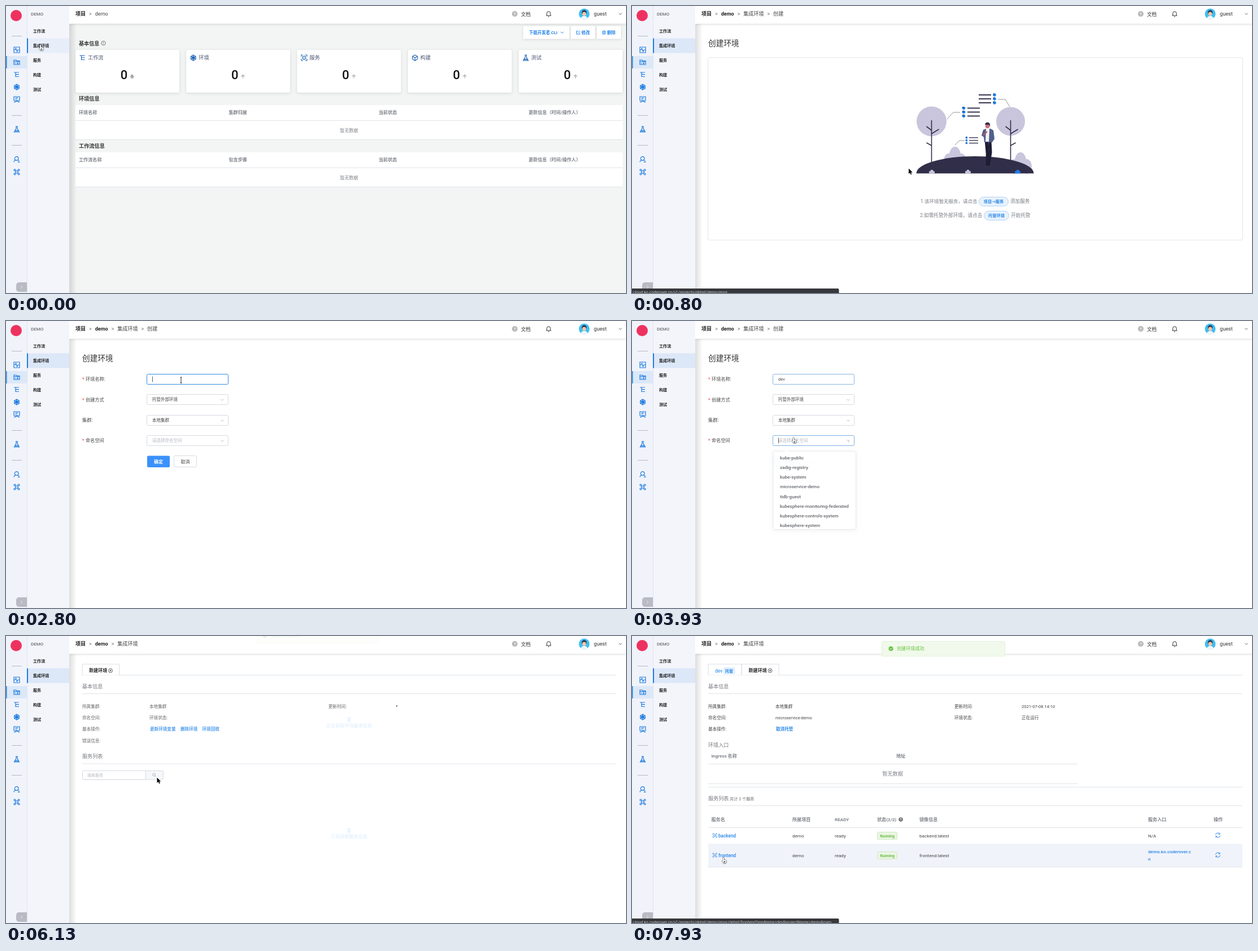
Animation, 1098 px wide and 510 px high, one loop 8 s. Source, as an HTML page with a canvas:

```html
<!DOCTYPE html>
<html lang="en">
<head>
<meta charset="utf-8">
<title>Create environment</title>
<style>
html, body { margin: 0; width: 100%; height: 100%; overflow: hidden; background: #fff }
canvas { display: block }
</style>
</head>
<body>
<canvas id="stage" width="1098" height="510"></canvas>
<script>
const g = document.getElementById('stage').getContext('2d');
const FONT = 'Roboto, "Noto Sans CJK SC", "Noto Sans CJK", sans-serif';
const BLUE = '#2585e8', LINE = '#dfe3ea', GRAY = '#7f838a', INK = '#333', FIELD = '#d6dae1';
const LOOP = 8000;
// Moments of the story, in ms
const OPEN_CREATE = 270, OPEN_FORM = 1330, FOCUS_NAME = 2500, OPEN_LIST = 3826,
      PICK = 5280, OPEN_ENV = 6100, LOADED = 6550;

const clamp = u => Math.max(0, Math.min(1, u));
const ramp = (t, start, length) => clamp((t - start) / length);
const smooth = u => u * u * (3 - 2 * u);

const ICONS = {
  pulse: 'M-5-5h10v10h-10zM-5 0h2l1.5-3 2 6 1.5-3h3',
  folder: 'M-5-4h4l1 1.5h5v6.5h-10zM-5-1.5h10M-3 .5h1M0 .5h3M-3 2.3h1M0 2.3h3',
  flow: 'M-5-4h9M-2-4v7.5h6M-2-.3h6',
  gear: 'M0-5 4.3-2.5v5L0 5-4.3 2.5v-5zM0-5V5M-4.3-2.5l8.6 5M4.3-2.5l-8.6 5M0-2.5 2.2-1.2v2.4L0 2.5-2.2 1.2v-2.4z',
  card: 'M-5-5h10v7h-10zM-2.5-2.7h5M-2.5-.5h3M-5 4.6h2l2-1.4h3l1 1.4h2.2',
  flask: 'M-2-5h4M-1-5v3.5L-4.5 5h9L1-1.5V-5M-3 2h6M-3.4 3.5h6.8',
  person: 'M3-1.5a3.3 3.3 0 1 1-6.6 0a3.3 3.3 0 1 1 6.6 0M-5 5q.5-4 4-3.5M2 2.5h3M2 4.8h3.5',
  command: 'M-2-2h4v4h-4zM-2-2h-1.3a1.5 1.5 0 1 1 1.3-1.3zM2-2v-1.3a1.5 1.5 0 1 1 1.3 1.3zM2 2h1.3a1.5 1.5 0 1 1-1.3 1.3zM-2 2v1.3a1.5 1.5 0 1 1-1.3-1.3z',
  cube: 'M0-5 4.5-2.5v5L0 5-4.5 2.5v-5zM-4.5-2.5 0 0 4.5-2.5M0 0V5',
  service: 'M-5-2v-3h3M5-2v-3h-3M-5 2v3h3M5 2v3h-3M0-3.2 2.8-1.6v3.2L0 3.2-2.8 1.6v-3.2zM-1 0h2',
  edit: 'M0-2.5h-3v5.5h5.5V0M-1 1l4-4',
  trash: 'M-3-2h6M-2.3-2v5h4.6v-5M-1-3h2M-.8-.5v2M.8-.5v2',
  refresh: 'M-4-.5A4 4 0 0 1 3.5-2M3.5-4.2v2.4H1M4 .5A4 4 0 0 1-3.5 2M-3.5 4.2V1.8H-1',
  bell: 'M-4.5 3h9M-3.2 3v-4a3.2 3.2 0 0 1 6.4 0v4M-1 5h2',
  search: 'M2-.5a2.4 2.4 0 1 1-4.8 0a2.4 2.4 0 1 1 4.8 0M1.3 1.2 3 3',
  plus: 'M3.5 0a3.5 3.5 0 1 1-7 0a3.5 3.5 0 1 1 7 0M-1.7 0h3.4M0-1.7v3.4',
  info: 'M3.7 0a3.7 3.7 0 1 1-7.4 0a3.7 3.7 0 1 1 7.4 0M0-2v2.4M0 1.2v.9',
  spinner: 'M-2.5-3h5L-2.5 3h5z',
  chevron: 'M-2.6-1.3 0 1.3 2.6-1.3',
  check: 'M-2 0l1.4 1.5 2.6-2.8'
};
for (const name in ICONS) ICONS[name] = new Path2D(ICONS[name]);
const ARROW = new Path2D('M0 0v9.5l2.2-2 1.6 3.4 1.5-.7-1.5-3.3h3z');
const HAND = new Path2D('M-.8 6V.8a.9.9 0 0 1 1.8 0V4l3.6.9q1 .4.8 1.7l-.8 4H0L-2.6 7q-.3-1.2.8-1z');
const IBEAM = new Path2D('M-1.5-5h3M0-5V5M-1.5 5h3');

// y is the optical middle of the line
function text(s, x, y, size, color = INK, weight = 400, align = 'left') {
  g.font = `${weight} ${size}px ${FONT}`;
  g.textAlign = align;
  g.fillStyle = color;
  g.fillText(s, x, y + size * .37);
}
function rect(x, y, w, h, fill, stroke, r = 0) {
  g.beginPath();
  g.roundRect(x, y, w, h, r);
  paint(fill, stroke);
}
function circle(x, y, r, fill, stroke) {
  g.beginPath();
  g.arc(x, y, r, 0, 7);
  paint(fill, stroke);
}
function paint(fill, stroke, width = 1) {
  g.lineWidth = width;
  if (fill) { g.fillStyle = fill; g.fill(); }
  if (stroke) { g.strokeStyle = stroke; g.stroke(); }
}
function line(color, width, ...p) {
  g.beginPath();
  for (let i = 0; i < p.length; i += 2) g.lineTo(p[i], p[i + 1]);
  paint(null, color, width);
}
const rule = (y, x2 = 1081, x1 = 135) => line(LINE, 1, x1, y, x2, y);
function at(x, y, draw) {
  g.save();
  g.translate(x, y);
  draw();
  g.restore();
}
function icon(name, x, y, color = BLUE, width = 1, angle = 0) {
  at(x, y, () => {
    g.rotate(angle);
    g.strokeStyle = color;
    g.lineWidth = width;
    g.stroke(ICONS[name]);
  });
}
function shadowed(blur, alpha, draw) {
  g.save();
  g.shadowColor = `rgba(0,0,0,${alpha})`;
  g.shadowBlur = blur;
  g.shadowOffsetY = 1;
  draw();
  g.restore();
}
function faded(alpha, draw) {
  g.save();
  g.globalAlpha *= alpha;
  draw();
  g.restore();
}
function mix(a, b, u) {
  return `rgb(${a.map((v, i) => v + (b[i] - v) * u)})`;
}

function sidebar(t) {
  rect(0, 0, 37, 510, '#f1f3fa');
  rect(37, 0, 75, 510, '#f3f5fb');
  g.setLineDash([1, 1]);
  line('#cfd4df', 1, 37.5, 0, 37.5, 510);
  g.setLineDash([]);
  circle(18, 17, 10, '#ee3260');
  for (const y of [53.5, 194.5, 247.5]) line('#b4b9c4', 1, 10, y, 28, y);
  rect(0, 89, 37, 22, '#dce8f8');
  rect(0, 89, 1.5, 22, BLUE);
  const items = { pulse: 78, folder: 100, flow: 122, gear: 144, card: 166, flask: 219, person: 272.5, command: 295 };
  for (const name in items) icon(name, 19, items[name], '#1b7be0', 1.2);
  rect(18, 491, 19, 17, '#b8bbc3', null, [5, 0, 0, 5]);
  icon('chevron', 27.5, 499.5, '#eee', 1, -Math.PI / 2);

  text('DEMO', 44, 14.5, 8, '#6b6e75', 500);
  rect(37, 57.5, 75, 26, t < OPEN_CREATE ? '#e7eefa' : '#dce7f8');
  rect(37, 57.5, 2, 26, '#1b7be0');
  ['工作流', '集成环境', '服务', '构建', '测试'].forEach((s, i) => text(s, 48, 44.5 + 26 * i, 7.1, '#222', 700));
}

function header(crumbs) {
  shadowed(3, .12, () => rect(112, 0, 986, 31.5, '#fff'));
  const gap = 16.5;
  let x = 123;
  crumbs.forEach((s, i) => {
    if (i) {
      text('>', x + gap / 2, 14, 9, '#666', 400, 'center');
      x += gap;
    }
    const strong = i === 0 || (i === 1 && crumbs.length > 2);
    text(s, x, 14, 9.1, strong ? '#222' : '#444', strong ? 700 : 400);
    x += g.measureText(s).width;
  });
  circle(901, 14, 5, '#b9b9b9');
  text('?', 901, 14, 7.5, '#fff', 500, 'center');
  text('文档', 912, 14.5, 8.6);
  icon('bell', 961, 14, '#333');
  circle(1024, 14, 9.5, '#3fbdf2');
  g.save();
  g.beginPath();
  g.arc(1024, 14, 9.5, 0, 7);
  g.clip();
  circle(1024, 24, 6.5, '#f4f8fb');
  circle(1024, 11.5, 4.3, '#2b3550');
  circle(1024, 14, 3.4, '#f3c6a5');
  g.restore();
  text('guest', 1041, 14, 9.2);
  icon('chevron', 1088, 14, '#666');
}

function dashboard() {
  rect(112, 0, 986, 510, '#f3f4f4');
  for (const [x, w] of [[916, 82], [1000, 43.5], [1046, 43]])
    shadowed(4, .12, () => rect(x, 35.5, w, 23, '#fff', null, 1));
  text('下载开发者 CLI', 926, 47, 7.5, BLUE, 700);
  icon('chevron', 985, 47);
  icon('edit', 1013.5, 47);
  text('修改', 1019, 47, 7.5, BLUE, 700);
  icon('trash', 1059, 47);
  text('删除', 1064.5, 47, 7.5, BLUE, 700);
  text('基本信息', 129, 66.5, 9.1, INK, 700);
  icon('info', 172.5, 66, '#555', .8);
  [['flow', '工作流', '条'], ['gear', '环境', '个'], ['service', '服务', '个'], ['cube', '构建', '个'], ['flask', '测试', '个']]
    .forEach(([name, title, unit], i) => {
      const x = 123 + 196.25 * i;
      shadowed(5, .12, () => rect(x, 78, 184, 76, '#fff', null, 3));
      icon(name, x + 12.5, 92, '#1d62b5', 1.1);
      text(title, x + 22, 91.5, 9.2, '#4a5570');
      text('0', x + 86, 121.5, 22, '#111', 500, 'center');
      text(unit, x + 97, 125.5, 7, '#444');
    });
  summary('环境', 165, ['环境名称', '集群归属']);
  summary('工作流', 249, ['工作流名称', '包含步骤']);
}
function summary(title, y, columns) {
  text(title + '信息', 129, y, 9.2, INK, 700);
  rect(123, y + 11, 969, 61.5, '#fff');
  columns.concat('当前状态', '更新信息（时间/操作人）')
    .forEach((s, i) => text(s, 129 + 265.5 * i, y + 24.5, 8.1, GRAY, 700));
  rule(y + 38.5, 1092, 123);
  text('暂无数据', 607.5, y + 56, 8.1, GRAY, 400, 'center');
  rule(y + 72.5, 1092, 123);
}

function createPage() {
  text('创建环境', 135, 66, 13.7, INK);
  rect(134.5, 91.5, 947, 324.5, '#fff', '#e1e4e9', 3);
  illustration();
  hint(511, 347, '1.该环境暂无服务，请点击', 8.5, 614, 53, '项目->服务', '添加服务');
  hint(510, 372, '2.如需托管外部环境，请点击', 8.6, 623, 45, '托管环境', '开始托管');
}
function hint(x, y, before, size, pillX, pillW, label, after) {
  text(before, x, y, size, '#777a80');
  rect(pillX + .5, y - 7.5, pillW - 1, 16, '#e8f2fd', '#b3d3f5', 8);
  text(label, pillX + pillW / 2, y + .5, 7.2, BLUE, 700, 'center');
  text(after, pillX + pillW + 3, y, 8.6, '#777a80');
}
function illustration() {
  const LILAC = '#c9c5dc', DARK = '#312e49';
  for (const [x, y, s] of [[572, 262, 1], [688, 272, 1]]) {
    g.beginPath();
    for (const [dx, dy, rx, ry] of [[0, 3, 10, 15], [-11, 13, 9, 13], [11, 13, 9, 13]]) {
      g.moveTo(x + dx + rx * s, y + dy);
      g.ellipse(x + dx, y + dy, rx * s, ry, 0, 0, 7);
    }
    paint(LILAC);
  }
  for (const [x, r] of [[530.5, 26.5], [670.5, 25.5]]) {
    circle(x, 205, r, LILAC);
    line(DARK, 1.6, x, 203, x, 278);
    line(DARK, 1.6, x - 9, 214, x, 221);
    line(DARK, 1.6, x + 13, 219, x, 227);
    const side = x < 600 ? -1 : 1;
    line(DARK, 1.6, x + side * 9, 243, x, 248);
  }
  g.beginPath();
  g.ellipse(607.5, 297.5, 104, 30.5, 0, Math.PI, 0);
  paint(DARK);
  for (const [x, color] of [[531, LILAC], [595, LILAC], [683, '#1f7cf0']]) {
    g.beginPath();
    g.roundRect(x - 5, 293.5, 10, 4, 1);
    g.roundRect(x - 2.5, 291, 5, 5, 2);
    paint(color);
  }
  for (const [x1, x2, dot, y, step] of [[614, 636, 642, 158, 7], [594, 616, 587.5, 181.5, 7], [597, 613, 592.5, 234, 4.8]])
    for (let i = 0; i < 3; i++) {
      line(DARK, step / 3.6, x1, y + step * i, x2, y + step * i);
      circle(dot, y + step * i, step * .4, '#2080ee');
      circle(dot - step * .2, y + step * i - step * .2, step * .14, DARK);
    }
  line('#777', .8, 648, 166, 661, 166, 669, 179);
  line('#777', .8, 581, 189, 569, 189, 558, 201);
  line('#777', .8, 589, 239, 580, 239, 572, 247);
  // Standing figure
  line('#1d1d33', 6.5, 628, 240, 630, 262, 630, 283);
  line('#1d1d33', 5, 634, 240, 635, 260, 631, 284);
  g.fillStyle = '#50608c';
  g.fill(new Path2D('M622 220l5-2h8l5 3 2 15-4 6h-14l-1-9-4-3z'));
  g.fillStyle = '#f5f3f5';
  g.fill(new Path2D('M627 218h6l-1 23h-6z'));
  line('#b85a68', 2.4, 622, 230, 629, 223);
  circle(629.5, 213.5, 3.8, '#c9707c');
  g.fillStyle = DARK;
  g.fill(new Path2D('M625 211q1-5 6-4 4 1 3 7l-2-3z'));
}

function field(y, value, options = {}) {
  const { color = '#444', focus = 0, turn = null, caret = null } = options;
  rect(249.5, y - 9, 144, 18, '#fff', mix([214, 218, 225], [48, 140, 225], focus), 2);
  text(value, 259, y - .5, 7.5, color);
  if (caret !== null) line('#333', .8, caret, y - 5, caret, y + 5);
  if (turn !== null) icon('chevron', 383, y + .5, '#b9bdc6', 1, -Math.PI * turn);
}
function formPage(t, tip) {
  text('创建环境', 135, 66, 13.7, INK);
  [['环境名称:', 103], ['创建方式', 139.5], ['集群:', 175.5], ['命名空间', 212]].forEach(([s, y], i) => {
    if (i !== 2) text('*', 135, y + 1, 8.2, '#f04848');
    text(s, i === 2 ? 135 : 141, y, 8.2, '#444');
  });
  const blur = ramp(t, OPEN_LIST, 200);
  const name = 'dev'.slice(0, Math.max(0, Math.floor((t - 2740) / 130)));
  const nameCaret = t > FOCUS_NAME && t < OPEN_LIST && Math.floor((t - FOCUS_NAME) / 500) % 2 === 0;
  field(103.5, name, { focus: ramp(t, FOCUS_NAME, 200) * (1 - blur), caret: nameCaret ? 259.5 + name.length * 4.2 : null });
  field(139.5, '托管外部环境', { turn: 0 });
  field(176.5, '本地集群', { turn: 0 });

  const picked = t >= PICK;
  const out = (start, power) => 1 - (1 - ramp(t, start, 300)) ** power;
  const open = out(OPEN_LIST, 5) - out(PICK, 5);
  const listCaret = t >= OPEN_LIST && !picked && Math.floor((t - OPEN_LIST) / 435) % 2 === 0;
  field(212.5, picked ? 'microservice-demo' : '请选择命名空间', {
    color: picked ? '#444' : '#b4b8c1', focus: blur,
    turn: out(OPEN_LIST, 2.8) - out(PICK, 2.8), caret: listCaret ? 259.5 : null
  });

  const hover = t > 5800;
  rect(250, 239.5, 40, 20.5, hover ? '#66adff' : '#3b91fb', null, 2);
  text('确定', 270, 250, 8.1, '#fff', 700, 'center');
  rect(297.5, 239.5, 40, 20, '#fff', FIELD, 2);
  text('取消', 317.5, 250, 8.1, '#444', 400, 'center');
  if (open > .005) dropdown(open, picked, tip);
}
function dropdown(open, picked, tip) {
  const top = 231.5, pitch = 19.45, pad = 3.4;
  const hovered = picked ? 3 : Math.floor((tip[1] - top - pad) / pitch);
  faded(open, () => at(250, top, () => {
    g.scale(1, open);
    shadowed(7, .08, () => rect(0, 0, 146.5, 157, '#fff', null, 2));
    rect(0, 0, 146.5, 157, '#fff', '#e4e7ed', 2);
    g.fillStyle = '#fff';
    g.fill(new Path2D('M20 .6l4-4 4 4z'));
    g.beginPath();
    g.rect(0, 0, 146.5, 157);
    g.clip();
    ['kube-public', 'zadig-registry', 'kube-system', 'microservice-demo', 'tidb-guest',
      'kubesphere-monitoring-federated', 'kubesphere-controls-system', 'kubesphere-system'].forEach((s, i) => {
      if (i === hovered) rect(0, pad + pitch * i, 146.5, pitch, '#f3f5f9');
      const chosen = picked && i === 3;
      text(s, 12, pad + pitch * (i + .5), 8.1, chosen ? BLUE : '#4c4f55', chosen ? 700 : 500);
    });
    if (hovered >= 0) rect(142.5, 1, 3, 80, '#d9dbdf', null, 1.5);
  }));
}

function tab(x, w) {
  g.beginPath();
  g.moveTo(x, 69.5);
  g.lineTo(x, 50);
  g.lineTo(x + w, 50);
  g.lineTo(x + w, 69.5);
  paint('#fff', '#d9dde5');
}
function newTab(x) {
  tab(x, 65.5);
  text('新建环境', x + 12, 61.5, 8.1, '#222', 700);
  icon('plus', x + 50, 61.5, '#333', .8);
}
const section = (s, y) => text(s, 135, y, 9.1, '#777a80');
const small = (s, x, y, color = '#444', weight = 400) => text(s, x, y, 7.6, color, weight);

function environmentPage(t, tip) {
  const loaded = t >= LOADED;
  rule(69.5);
  section('基本信息', 90);
  rule(102.5);
  small('所属集群:', 135, 125);
  small('本地集群', 254, 125);
  small('更新时间:', 571, 125);
  small('命名空间:', 135, 145.5);
  small('基本操作:', 135, 165.5);
  if (loaded) environmentData(tip); else environmentBlank();
  const veil = ramp(t, 6070, 300) * (1 - ramp(t, LOADED, 250));
  faded(veil, () => {
    faded(.9, () => { rect(135, 113, 946, 84, '#fff'); rect(135, 258, 946, 190, '#fff'); });
    [['环境基本', 159.5], ['服务', 356.5]].forEach(([s, y]) => {
      text(`正在获取${s}信息`, 607.5, y, 8.1, '#409eff', 400, 'center');
      icon('spinner', 607.5, y - 11, '#409eff');
    });
  });
}
function environmentBlank() {
  newTab(135);
  circle(692, 124.5, 1.2, '#444');
  small('环境状态:', 254, 145.5);
  small('更新环境变量', 255, 165.5, BLUE, 700);
  small('删除环境', 309, 165.5, BLUE, 700);
  small('环境回收', 347.5, 165.5, BLUE, 700);
  small('错误信息:', 135, 186);
  section('服务列表', 214);
  rule(227);
  rect(135.5, 239.5, 143, 15.5, '#f5f7fa', FIELD, 2);
  rect(135.5, 239.5, 111.5, 15.5, '#fff', FIELD, [2, 0, 0, 2]);
  text('搜索服务', 144, 247, 7, '#b4b8c1');
  icon('search', 262.5, 247, '#9a9ea6', .8);
}
function environmentData(tip) {
  tab(135, 59);
  text('dev', 147, 61.5, 8.6, BLUE);
  rect(162, 55.5, 20.5, 12.5, '#e1effd', null, 2);
  text('托管', 165, 62, 7, BLUE, 700);
  newTab(194.5);
  small('2021-07-08 14:10', 690, 125);
  small('microservice-demo', 254, 145.5);
  small('环境状态:', 571, 145.5);
  small('正在运行', 690, 145.5);
  small('取消托管', 255, 165.5, BLUE, 700);
  section('环境入口', 194);
  text('Ingress 名称', 140.5, 213.5, 8.1, GRAY, 700);
  text('地址', 468, 213.5, 8.1, GRAY, 700);
  rule(227.5, 789);
  text('暂无数据', 461.5, 245, 9.2, GRAY, 400, 'center');
  rule(262.5, 789);
  rule(268.5);
  section('服务列表', 288.5);
  text('共计 2 个服务', 173, 289.5, 7.2, '#666');
  rule(301.5);
  Object.entries({ 服务名: 140.5, 所属项目: 284, READY: 359, '状态(2/2)': 434, 镜像信息: 509, 服务入口: 914, 操作: 1030 })
    .forEach(([s, x]) => text(s, x, 326.5, 8.1, GRAY, 700));
  circle(476, 326, 3.8, '#777');
  text('?', 476, 326, 6, '#fff', 700, 'center');
  rule(340.5);
  serviceRow('backend', 341, 28, 355, 354, tip);
  serviceRow('frontend', 369, 41, 390, 389, tip);
  text('N/A', 914, 355, 8.1, '#444');
  text('demo.ko.coderover.c', 914, 383, 8.1, BLUE, 500);
  text('n', 914, 396.5, 8.1, BLUE, 500);
}
function serviceRow(name, top, height, y, iconY, tip) {
  if (tip[1] > top && tip[1] < top + height) rect(135, top, 946, height, '#f1f3fa');
  rule(top + height + .5);
  at(146.7, y - .5, () => { g.scale(.7, .7); icon('service', 0, 0, BLUE, 1.2); });
  text(name, 153, y, 8.2, BLUE, 500);
  text('demo', 284, y, 8.1, '#444');
  text('ready', 359, y, 8.1, '#444');
  rect(434.5, y - 6.5, 35, 13, '#eaf6e3', '#cfe9c0', 2);
  text('Running', 452, y, 7, '#5cb531', 500, 'center');
  text(name + ':latest', 509, y, 8.1, '#444');
  icon('refresh', 1037.5, iconY);
}

function toast(t) {
  const u = ramp(t, 6080, 350);
  faded(u, () => at(0, -27 * (1 - u), () => {
    rect(442.5, 9.5, 218, 26.5, '#f0f9eb', '#e1f3d8', 2);
    circle(458.5, 22.5, 4, '#67c23a');
    icon('check', 458.5, 22.5, '#fff');
    text('创建环境成功', 469, 22.5, 8.1, '#67c23a');
  }));
}
function statusBar(path) {
  rect(0, 502, 366.5, 10, '#37383b', null, [0, 2, 0, 0]);
  text('cloud.ko.coderover.cn/v1/projects/detail/demo/envs' + path, 2, 508, 7.1, '#c9cacc');
}

// Pointer path: start, end, x, y of each eased move
const MOVES = [
  [270, 1068, 641.5, 366.5], [1800, 2450, 310, 105], [3050, 3470, 286, 207],
  [4270, 4900, 304, 302], [5380, 5900, 267.5, 251.5], [7000, 7800, 162, 393.5]
];
function pointerTip(t) {
  let x = 61, y = 69;
  for (const [start, end, toX, toY] of MOVES) {
    const u = smooth(ramp(t, start, end - start));
    x += (toX - x) * u;
    y += (toY - y) * u;
  }
  return [x, y];
}
function pointer(t, [x, y]) {
  const within = spans => spans.some(([a, b]) => t >= a && t < b);
  at(x, y, () => {
    g.lineJoin = 'round';
    if (within([[2390, 3130]])) {
      g.strokeStyle = '#222';
      g.lineWidth = 1;
      g.stroke(IBEAM);
      return;
    }
    const hand = within([[0, 400], [980, OPEN_FORM], [3380, 5450], [5800, OPEN_ENV], [7660, LOOP]]);
    const shape = hand ? HAND : ARROW;
    g.lineWidth = hand ? 1 : 1.6;
    g.strokeStyle = hand ? '#222' : '#fff';
    g.fillStyle = hand ? '#fff' : '#000';
    g.stroke(shape);
    g.fill(shape);
    if (hand) line('#222', .7, 1, 7, 1, 9.5, 1, 7, 3, 7, 3, 9.5);
  });
}

function render(t) {
  const tip = pointerTip(t);
  rect(0, 0, 1098, 510, '#fff');
  if (t < OPEN_CREATE) dashboard();
  else if (t < OPEN_FORM) createPage();
  else if (t < OPEN_ENV) formPage(t, tip);
  else environmentPage(t, tip);

  const shade = g.createLinearGradient(112, 0, 125, 0);
  shade.addColorStop(0, 'rgba(0,0,0,.13)');
  shade.addColorStop(1, 'rgba(0,0,0,0)');
  rect(112, 32, 13, 478, shade);
  const crumbs = ['项目', 'demo'];
  if (t >= OPEN_CREATE) crumbs.push('集成环境');
  if (t >= OPEN_CREATE && t < OPEN_ENV) crumbs.push('创建');
  header(crumbs);
  sidebar(t);
  toast(t);
  if (t >= 70 && t < 930) statusBar('');
  if (t >= 7720) statusBar('/detail/frontend?envName=dev&projectName=demo&nam...');
  pointer(t, tip);
}

const began = performance.now();
function tick() {
  render((performance.now() - began) % LOOP);
  requestAnimationFrame(tick);
}
tick();
</script>
</body>
</html>
```
